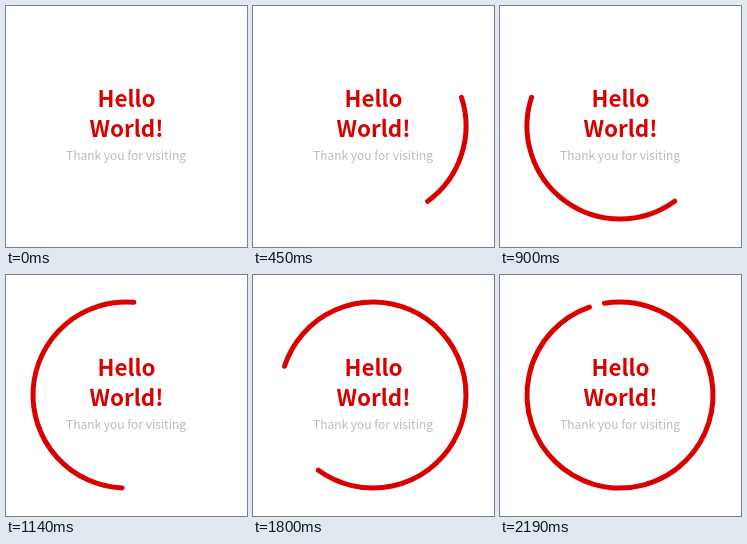
Recreate the animation shown at these times as an HTML page. Size 241 by 241 pixels, loop 2250 ms.

```html
<!DOCTYPE html>
<html lang="en">
<head>
<meta charset="utf-8">
<title>Hello World</title>
<style>
  html, body { margin: 0; width: 100%; height: 100%; overflow: hidden; background: #fff; }
  svg { display: block; width: 100%; height: 100%; }
  text { font-family: "Noto Sans CJK JP", "Noto Sans CJK SC", "Noto Sans CJK", "Noto Sans", sans-serif; text-anchor: middle; }
  .title { font-size: 22.4px; font-weight: 700; fill: #d90000; }
  .note { font-size: 12px; fill: #bbb; }
  #arc { fill: none; stroke: #d90000; stroke-width: 5; stroke-linecap: round; }
</style>
</head>
<body>
<svg viewBox="0 0 241 241">
  <path id="arc"/>
  <text class="title" x="120.5" y="101">Hello</text>
  <text class="title" x="120.5" y="131">World!</text>
  <text class="note" x="120" y="154">Thank you for visiting</text>
</svg>
<script>
  const LOOP = 2250, STEP = 30, LAST = 2190;
  const CENTER = 120, RADIUS = 93;
  const arc = document.getElementById('arc');
  const begin = performance.now();

  // Turns run clockwise from the top.
  function point(turn) {
    const a = turn * 2 * Math.PI;
    return (CENTER + RADIUS * Math.sin(a)).toFixed(3) + ' ' +
           (CENTER - RADIUS * Math.cos(a)).toFixed(3);
  }

  // The head makes two turns per loop while the tail makes one.
  function draw(ms) {
    const t = Math.min(Math.floor(ms / STEP) * STEP, LAST) / LOOP;
    arc.setAttribute('d', t === 0 ? '' :
      `M${point(t)}A${RADIUS} ${RADIUS} 0 ${t > 0.5 ? 1 : 0} 1 ${point(2 * t)}`);
  }

  function tick() {
    draw(Math.max(0, performance.now() - begin) % LOOP);
    requestAnimationFrame(tick);
  }
  tick();
</script>
</body>
</html>
```
